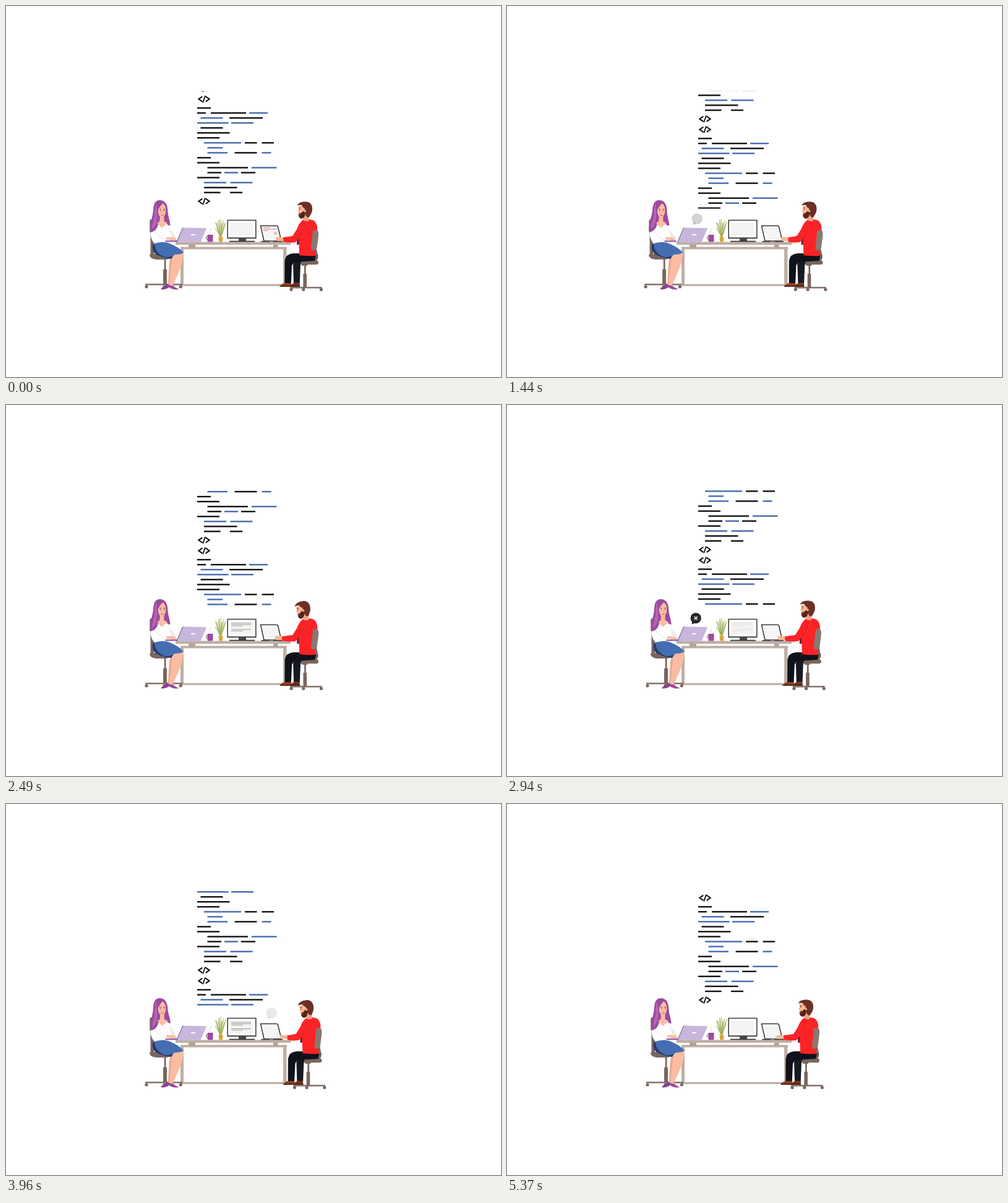
An HTML page with a canvas for the animation above (5.4 s loop, 800x600 px).

```html
<!DOCTYPE html>
<html lang="en">
<head>
<meta charset="utf-8">
<title>Coding desk</title>
<style>
html, body { margin: 0; width: 100%; height: 100%; overflow: hidden; background: #fff; }
canvas { display: block; }
</style>
</head>
<body>
<canvas id="stage" width="800" height="600"></canvas>
<script>
const ctx = document.getElementById('stage').getContext('2d');
const LOOP = 5400, STEP = 30;
const INK = '#111', BLUE = '#456bb0', WOOD = '#beafa5', SEAT = '#78665f', SKIN = '#fabca2';

// ---------- helpers ----------
function ramp(t, a, b) {
  const p = Math.min(1, Math.max(0, (t - a) / (b - a)));
  return p * p * (3 - 2 * p);
}

function keyed(t, keys) {
  for (let i = 1; i < keys.length; i++) {
    const a = keys[i - 1], b = keys[i];
    if (t <= b[0]) {
      const p = (t - a[0]) / (b[0] - a[0]);
      return a.map((v, n) => v + (b[n] - v) * p);
    }
  }
  return keys[keys.length - 1];
}

function fill(d, color) {
  ctx.fillStyle = color;
  ctx.fill(new Path2D(d));
}

function line(d, color, width) {
  ctx.strokeStyle = color;
  ctx.lineWidth = width;
  ctx.stroke(new Path2D(d));
}

function rect(x, y, w, h, color) {
  ctx.fillStyle = color;
  ctx.fillRect(x, y, w, h);
}

function pill(x, y, w, h, r, color) {
  ctx.fillStyle = color;
  ctx.beginPath();
  ctx.roundRect(x, y, w, h, r);
  ctx.fill();
}

function dot(x, y, r, color) {
  ctx.fillStyle = color;
  ctx.beginPath();
  ctx.arc(x, y, r, 0, 7);
  ctx.fill();
}

function group(x, y, draw) {
  ctx.save();
  ctx.translate(x, y);
  draw();
  ctx.restore();
}

function tilt(x, y, deg, draw) {
  ctx.save();
  ctx.translate(x, y);
  ctx.rotate(deg * Math.PI / 180);
  ctx.translate(-x, -y);
  draw();
  ctx.restore();
}

// ---------- scrolling code ----------
const ROWS = [
  'k0-22', 'k0-14 k22-79 b84-114', 'b5.5-41.5 k52-106', 'b0-50.5 b55-91',
  'k5.5-41.5', 'k0-52.5', 'k0-36', 'b11-71 k77-96.5 k104.5-124',
  'b16.5-41', 'b16.5-49 k60.5-96.5 b104.5-119.5', 'k0-22', 'k0-36',
  'k16.5-82 b88-128.5', 'k16.5-39 b44-66 k71-94', 'k0-36',
  'b11-47 b53.5-89.5', 'k11-64.5', 'k11-37.5 k53-73'
].map(row => row.split(' ').map(s => {
  const [from, to] = s.slice(1).split('-').map(Number);
  return { from, to, color: s[0] === 'b' ? BLUE : INK };
}));
const BLOCK = 182.4;

function tag(y) {
  group(320, y, () => {
    line('M-2.7-4.2L-8.6 0L-2.7 4.2M2.7-4.2L8.6 0L2.7 4.2', INK, 2.1);
    line('M2-5.4L-1.8 5.6', INK, 1.8);
  });
}

function codeBlock(y) {
  tag(y);
  ROWS.forEach((row, i) => row.forEach(s =>
    rect(309 + s.from, y + 13.3 + i * 8.04, s.to - s.from, 2.4, s.color)));
  tag(y + 165.3);
}

function code(t) {
  ctx.save();
  ctx.beginPath();
  ctx.rect(300, 137.8, 150, 189.9);
  ctx.clip();
  const y = 150.5 + t * 0.0342;
  codeBlock(y);
  codeBlock(y - BLOCK);
  ctx.restore();
}

// ---------- furniture ----------
function desk() {
  rect(282, 389.5, 172, 4, WOOD);
  rect(282, 390, 5, 62.5, WOOD);
  rect(448, 390, 5.5, 62.5, WOOD);
  rect(282, 449.7, 171.5, 3.2, WOOD);
  rect(295, 386, 11, 5, '#b3a296');
  rect(432, 386, 7.5, 5, '#b3a296');
  rect(274, 381.6, 186, 4.6, WOOD);
  rect(460, 381.8, 7, 2.8, '#e6dfda');
}

function mugAndPlant() {
  line('M329 369C332 366 327 364 330 362Q332 361 331 359.5', '#bbb', 0.7);
  line('M327 373Q323.2 371.8 323.5 375Q324 378 327 378', '#a04b9e', 1.1);
  pill(325.5, 370, 9, 11.6, 1.5, '#a04b9e');
  rect(326, 370, 8, 1.2, '#813b82');
  const tips = [338, 339, 342, 344, 347, 349, 351.5, 353.5, 355];
  tips.forEach((x, i) => {
    const top = [359, 350, 351, 346, 344.5, 351, 347, 353, 349][i];
    line(`M347 375Q${(x + 347) / 2} 365 ${x} ${top}`, i % 2 ? '#86a04a' : '#b2bd63', 1.2);
  });
  fill('M343.3 373.5H350.7L349.8 381.6H344.3Z', '#dfa33b');
}

const SCROLL = [
  [0, 372, 0], [400, 372, 1], [780, 352, 1], [1100, 352, 1], [1300, 352, 0],
  [1310, 372, 0], [1500, 372, 1], [2070, 356.7, 1], [2500, 352, 1], [2940, 352, 0.2],
  [3050, 352, 0], [3060, 372, 0], [3300, 372, 1], [3960, 352.5, 1], [4200, 352, 1],
  [4400, 352, 0], [4410, 372, 0], [4500, 371, 1], [4770, 363.3, 1], [5150, 352, 1], [5340, 352, 0]
];

function monitor(t) {
  rect(376, 376, 12, 4.5, '#4b4748');
  rect(361, 379.8, 41, 1.7, '#353132');
  rect(357.4, 345.7, 47.2, 30.6, '#444041');
  rect(359, 347.3, 44, 27, '#fff');
  rect(362.5, 351, 36.5, 20, '#f3f3f2');
  const [, y, alpha] = keyed(t, SCROLL);
  ctx.save();
  ctx.beginPath();
  ctx.rect(362, 351, 37, 20);
  ctx.clip();
  ctx.globalAlpha = alpha;
  [[0, 32], [2.3, 32], [4.6, 19], [10.5, 32], [12.8, 19]].forEach(([dy, w], i) =>
    rect(364, y + dy, w, 1, i % 2 ? '#9b9693' : '#b0a29d'));
  ctx.restore();
}

function rightLaptop(t) {
  fill('M411.5 355.5H437.5Q439 355.5 439.4 357L445 380H417Z', '#f5f5f5');
  line('M411.5 355.5H437.5Q439 355.5 439.4 357L445 380H417Z', '#302e2f', 1.5);
  line('M413.3 357.2H437.6L442.8 378H418.4Z', '#fff', 1);
  ctx.save();
  ctx.globalAlpha = 1 - ramp(t, 850, 1250);
  const y = ramp(t, 0, 900) * 10;
  group(y / 5, y, () => {
    line('M416 358.6H427M415.5 361H438M416 363.3H423', '#dc6b70', 0.8);
    if (y < 8) line('M433 366H438M433 368.5H438.5', '#9f7175', 0.8);
  });
  ctx.restore();
  rect(412.5, 380, 34.5, 1.8, '#4b494b');
  rect(426, 380, 6, 1.7, '#999');
}

function leftLaptop() {
  fill('M285 358.5L275 382H279L289 358.7Z', '#85759a');
  fill('M287.5 358.6L323 359.2Q324.2 359.3 323.8 360.4L314.5 381.7H276.5L286 359.6Z', '#c8b6dd');
  rect(299, 369.2, 7, 1.8, '#fff');
}

// ---------- people ----------
function casters(xs, y) {
  xs.forEach(x => dot(x, y, 2.6, SEAT));
}

function womanHead() {
  fill('M249 314C241 314 238.5 320 238 330C237 343 231 353 233.5 366C241 365 245 359 246.5 351L258 349C260 354 263 355 265.5 355C265 345 261.5 340 261.3 330C261 319 255 314 249 314Z', '#9b4b9f');
  fill('M243 319C239 326 242 338 238 349Q236 355 236 361C244 355 244 345 244 335Z', '#b764b4');
  fill('M248.7 339H255.5V348Q258 350 261 351L252 359L244 351Q248.5 349 248.7 346Z', SKIN);
  fill('M245.8 327Q246 320 253 319Q258.5 321 258.4 330Q258.2 340 252.2 343Q246 340 245.8 332Z', SKIN);
  fill('M245 332Q247.5 325 253.5 319Q257.5 322 258.8 329Q262 318 250 316Q241 318 245 332Z', '#9b4b9f');
  line('M248 328.6H250.7M254.2 328.6H257', '#54355b', 0.8);
  dot(249.5, 330.5, 0.7, '#403145');
  dot(255.7, 330.5, 0.7, '#403145');
  line('M252.8 331L252.5 334.8H253.7', '#dc9381', 0.6);
  line('M250.5 338Q252.5 339.2 254.7 338', '#c94f62', 1);
}

function woman(t) {
  pill(232.3, 345, 7, 22, 3, SEAT);
  rect(233.5, 366, 5.5, 39, SEAT);
  fill('M232 403Q232 401 236 401H264L266 406Q264 410 257 410H243Q233 409 232 403Z', SEAT);
  rect(255.7, 409, 2.8, 18, SEAT);
  rect(254, 426, 6, 24, SEAT);
  rect(225, 449.2, 60, 2.3, SEAT);
  casters([227, 256, 282.3], 454);

  // legs and shoes
  fill('M267 400L279 401C277 416 274 432 267 452L261.8 452C263 437 263 420 265 410Z', '#eba88f');
  fill('M270 400Q285 396 287 401C286 417 277 436 269 453H263.5C266 434 267 419 270 400Z', SKIN);
  fill('M250.5 457Q255 453 260 450Q264 451 265 454Q258 459 251 458.5Z', '#8b4090');
  fill('M262.5 450Q266 453 270 452Q273 456 279 457.4Q278 459 272 458.5Q265 457 262 453Z', '#9c489e');

  // skirt
  fill('M238 384Q234 396 243 402Q255 408 267 409L272 401L254 389Z', '#283b69');
  fill('M240 383Q250 380 262 383Q280 390 287 399Q282 402 273 402Q266 407 257 406Q240 400 240 383Z', '#446eb1');

  // blouse and hands
  fill('M244 349Q236 350 234 362Q232 376 240 384Q250 381 264 382L261 362L271 378L277 375Q270 356 261 350L252 359Z', '#fdfdfd');
  line('M264 359Q269 368 273 377M240 364Q246 374 257 377', '#dedde0', 0.8);
  fill('M265 361Q271 367 276 376L270 378Q265 370 265 361Z', '#ececea');
  tilt(250, 331, 1.2 * Math.sin(t / LOOP * Math.PI * 2), womanHead);
  const tap = 0.7 * Math.sin(t * Math.PI / 180);
  fill(`M259 374Q266 ${373 + tap} 273 ${375 + tap}L276 379H268L259 377.5Z`, SKIN);
  rect(257.5, 379.3, 19, 2.2, '#8c55a1');
}

function manHead() {
  fill('M480 338H490L489 348Q484 349 480 346Z', '#eba482');
  fill('M473 323H486V337Q479 342 473.4 337L473 333L471 331.7L473 328Z', '#f8b794');
  fill('M470.8 323C472 318 478 316 485 316.5C493 317 496 323 494.8 331C494 336 491 339 489.5 342Q485 342 483.5 336L482.5 327Q479 326 478.5 322.5Q474 321 470.8 323Z', '#6c3026');
  fill('M473 335Q477 336 479 333L482 331L484 336Q482 344 477 344Q472 343 473 335Z', '#572219');
  dot(483, 331.5, 1.9, '#f3aa87');
  line('M473.3 326.5H476.3', '#572219', 0.9);
  dot(474.7, 328.7, 0.7, '#38201b');
  line('M473 337H476', '#eb9988', 0.8);
}

function man(t) {
  // chair base
  pill(459, 411.3, 46, 7, 3.5, SEAT);
  rect(478, 417, 9, 3, SEAT);
  rect(482, 418, 2.7, 16, SEAT);
  rect(480.3, 433, 5.6, 22, SEAT);
  rect(459, 454.3, 51.5, 2.3, SEAT);
  casters([461, 480.7, 509.4], 458.5);

  // trousers and shoes
  fill('M470 403L480 401L476 417L474.7 449H465L464 419Z', '#171922');
  fill('M474 400L504 402Q505 411 500 412L470 414Q463 414 462 420L460.7 449H450.3L450.5 412Q452 401 464 400Z', '#10121b');
  fill('M460 453Q462 449 466 447.5H474.5L475 453Z', '#75331e');
  fill('M443 453Q445 449 451 448H460.7L462 453Z', '#8f401f');
  rect(442.5, 452.6, 32.5, 1.5, '#31150f');

  // sweater and hand
  rect(470, 376, 5, 10, '#652545');
  fill('M480 345.5Q486 344.5 493 345.5Q502 347 503 358Q503 383 500 404Q486 405 474 403L473 372Q474 355 480 345.5Z', '#fc2326');
  const reach = -2 * Math.sin(t * Math.PI / 200);
  group(reach, 0, () =>
    fill('M449 374Q442 373 437 374Q435 377 438 380H449Z', '#f8b794'));
  fill(`M480 346Q474 350 470 361L463 372L${448 + reach} 374.2L${448 + reach} 381.5Q458 383 468 382Q475 374 483 358Z`, '#fc2326');
  line('M483 358Q479 368 473.5 375V386', '#d71d25', 0.8);

  // chair back
  line('M500.5 393Q504 407 500 412', SEAT, 3);
  fill('M496 363Q500 361.5 503.5 363Q505.3 365 505 371L502.5 391Q501 396 496 395.5Q493 395 493 391Z', '#897970');

  const nod = ramp(t, 1850, 2250) - ramp(t, 2500, 2850) + ramp(t, 3450, 3900) - ramp(t, 4900, 5370);
  tilt(486, 346, -11 * nod, manHead);
}

// ---------- speech bubbles ----------
const BUBBLES = [
  { start: 50, x: 429, y: 338.2, mark: 'cross' },
  { start: 1379, x: 307.2, y: 344, mark: 'check' },
  { start: 2650, x: 305.2, y: 344.6, mark: 'cross' },
  { start: 3929, x: 429, y: 337.8, mark: 'check' }
];
const MARKS = { cross: 'M-2.6-2.6L2.6 2.6M2.6-2.6L-2.6 2.6', check: 'M-3.5 0L-1 2.5L3.7-2.6' };

function bubble(t, b) {
  const age = t - b.start;
  const alpha = Math.min(1, age / 300, (895 - age) / 300);
  if (alpha <= 0) return;
  group(b.x, b.y, () => {
    ctx.globalAlpha = alpha;
    dot(0, 0, 8.7, '#202020');
    fill('M-6 5L-6.5 10.2L-1 8Z', '#202020');
    line(MARKS[b.mark], '#fff', 1.5);
  });
}

// ---------- timeline ----------
function draw(t) {
  rect(0, 0, 800, 600, '#fff');
  code(t);
  desk();
  mugAndPlant();
  monitor(t);
  rightLaptop(t);
  const left = t < 1800 ? -4.9 * Math.sin(Math.PI * t / 1800) : 0;
  group(left, 0, () => woman(t));
  leftLaptop();
  const right = ramp(t, 0, 1500) - ramp(t, 1500, 2150) + ramp(t, 2400, 3450) - ramp(t, 4050, 4550);
  group(5.4 * right, 0, () => man(t));
  BUBBLES.forEach(b => bubble(t, b));
}

const begin = performance.now();
function tick() {
  const t = (performance.now() - begin) % LOOP;
  draw(Math.floor(t / STEP) * STEP);
  requestAnimationFrame(tick);
}
tick();
</script>
</body>
</html>
```
